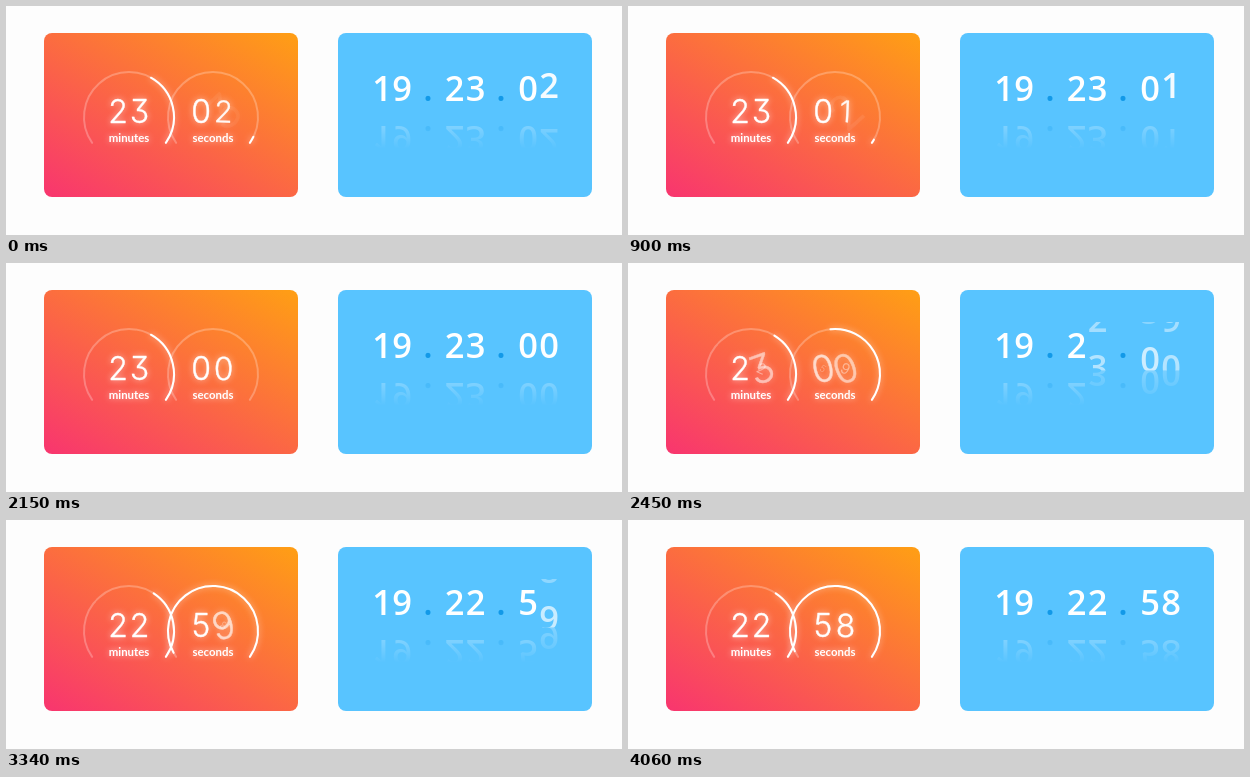
Animation of 616x229 px, one loop 4160 ms. Source, as an HTML page:

```html
<!DOCTYPE html>
<html lang="en">
<head>
<meta charset="utf-8">
<title>Countdown cards</title>
<style>
  html, body { margin: 0; width: 100%; height: 100%; overflow: hidden; background: #fdfdfd; }
  svg { display: block; width: 616px; height: 229px; }
  text { text-anchor: middle; fill: #fff; }
  .round { font: 300 32px Inter, Lato, sans-serif; font-feature-settings: "cv09"; stroke: #fff; stroke-width: .4px; stroke-linejoin: round; }
  .label { font: 700 11.4px Lato, "Open Sans", sans-serif; }
  .flat { font: 600 34.5px "Open Sans", "Noto Sans", sans-serif; }
  .flat .dot { fill: #1299e8; }
  .glow { filter: drop-shadow(0 0 3px rgba(255, 255, 255, .6)); }
  .track, .arc { fill: none; stroke: #fff; stroke-width: 2; stroke-linecap: round; }
  .track { stroke-opacity: .25; }
</style>
</head>
<body>
<svg viewBox="0 0 616 229">
  <defs>
    <linearGradient id="sunset" gradientUnits="userSpaceOnUse" x1="97.8" y1="225.5" x2="232.2" y2="-7.5">
      <stop offset="0" stop-color="#f8356f"/>
      <stop offset="1" stop-color="#ff9f14"/>
    </linearGradient>
    <linearGradient id="fade" gradientUnits="userSpaceOnUse" x1="0" y1="108" x2="0" y2="143">
      <stop offset="0" stop-color="#fff" stop-opacity=".36"/>
      <stop offset="1" stop-color="#fff" stop-opacity="0"/>
    </linearGradient>
    <mask id="mirror" maskUnits="userSpaceOnUse" x="332" y="107" width="254" height="50">
      <rect x="332" y="107" width="254" height="50" fill="url(#fade)"/>
    </mask>
    <clipPath id="window"><rect x="332" y="59" width="254" height="48.5"/></clipPath>
  </defs>

  <rect x="38" y="27" width="254" height="164" rx="8" fill="url(#sunset)"/>
  <g id="dials"></g>
  <g id="dialDigits" class="round"></g>
  <g class="label glow">
    <text x="123" y="136">minutes</text>
    <text x="207" y="136">seconds</text>
  </g>

  <rect x="332" y="27" width="254" height="164" rx="8" fill="#58c4ff"/>
  <g id="row" class="flat" clip-path="url(#window)">
    <text x="376" y="95">1</text>
    <text x="396" y="95">9</text>
    <text class="dot" x="422" y="95">.</text>
    <text class="dot" x="495" y="95">.</text>
  </g>
  <g mask="url(#mirror)">
    <use href="#row" transform="translate(0 215) scale(1 -1)"/>
  </g>
</svg>

<script>
const LOOP = 4160;
const FIRST = -510, PERIOD = 930;      // when each countdown tick begins
const PITCH = 48;                      // travel of a rolling digit
const SWEEP = 250, ARC_END = 35;       // dial opening, in degrees
const RADIUS = 45, DIAL_Y = 111;
const values = ['2303', '2302', '2301', '2300', '2259', '2258'];
const lag = [0, 0, 50, 0];
const dialX = [112, 133.5, 195, 217.5];
const rowX = [448.5, 469.5, 522, 543];

const byId = id => document.getElementById(id);

function add(parent, tag, attrs) {
  const el = document.createElementNS('http://www.w3.org/2000/svg', tag);
  for (const k in attrs) el.setAttribute(k, attrs[k]);
  return parent.appendChild(el);
}

function arcPath(cx, span) {
  const point = deg => {
    const a = deg * Math.PI / 180;
    return (cx + RADIUS * Math.cos(a)).toFixed(2) + ' ' + (DIAL_Y + RADIUS * Math.sin(a)).toFixed(2);
  };
  return `M${point(ARC_END - span)}A${RADIUS} ${RADIUS} 0 ${span > 180 ? 1 : 0} 1 ${point(ARC_END)}`;
}

const dials = [123, 207].map(cx => {
  add(byId('dials'), 'path', { class: 'track', d: arcPath(cx, SWEEP) });
  const glow = add(byId('dials'), 'g', { class: 'glow' });
  return { cx, arc: add(glow, 'path', { class: 'arc' }) };
});

const cells = dialX.map((x, i) => {
  const group = add(byId('dialDigits'), 'g', { class: 'glow' });
  const dialText = () => add(group, 'text', { y: 11.5 });
  const rowText = () => add(byId('row'), 'text', { x: rowX[i] });
  return { x, dialOld: dialText(), dialNew: dialText(), rowOld: rowText(), rowNew: rowText() };
});

// critically damped spring for digits, plain decay for the dials
const spring = ms => {
  const u = Math.max(0, ms) * .009;
  return 1 - (1 + u) * Math.exp(-u);
};
const decay = ms => 1 - Math.exp(-.0036 * (ms + 40));

function place(el, char, opacity, transform) {
  if (el.textContent !== char) el.textContent = char;
  el.setAttribute('opacity', opacity.toFixed(3));
  el.setAttribute('transform', transform);
}

function drawCell(cell, from, to, p) {
  const spin = (deg, scale) => `translate(${cell.x} 105.5) rotate(${deg}) scale(${scale})`;
  const roll = offset => `translate(0 ${95 + offset})`;
  if (from === to) p = 1;
  place(cell.dialOld, from, 1 - p, spin(-45 * p, 1 + .5 * p));
  place(cell.dialNew, to, p, spin(45 * (1 - p), p));
  place(cell.rowOld, from, 1 - p, roll(PITCH * p));
  place(cell.rowNew, to, p, roll(PITCH * (p - 1)));
}

function draw(t) {
  const tick = Math.min(values.length - 2, Math.floor((t - FIRST) / PERIOD));
  const elapsed = t - FIRST - tick * PERIOD;
  const from = values[tick], to = values[tick + 1];

  cells.forEach((cell, i) => drawCell(cell, from[i], to[i], spring(elapsed - lag[i])));

  dials.forEach(({ cx, arc }, i) => {
    const read = s => +s.slice(i * 2, i * 2 + 2);
    const count = read(from) + (read(to) - read(from)) * decay(elapsed);
    const span = count / 60 * SWEEP;
    arc.setAttribute('d', span > .3 ? arcPath(cx, span) : '');
  });
}

const start = performance.now();
function frame() {
  draw((performance.now() - start) % LOOP);
  requestAnimationFrame(frame);
}
frame();
</script>
</body>
</html>
```
